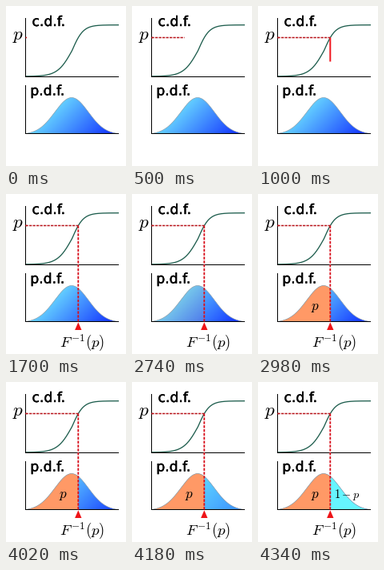
Write a matplotlib script that moves like this. It is 150 by 200 pixels and loops after 9340 ms.

```python
import numpy as np
import matplotlib.pyplot as plt
from matplotlib.animation import FuncAnimation
from matplotlib.patheffects import withStroke

plt.rcParams["mathtext.fontset"] = "cm"
plt.rcParams["font.family"] = "DejaVu Sans"

W, H, DPI = 150, 200, 100
LOOP, STEP = 9340, 20
PX = 72 / DPI                    # points per pixel
X0, XQ, XEND = 24.5, 90.3, 141   # left axis, quantile, right end
YP, Y_CDF, Y_PDF = 39.5, 88.5, 159.5
RED, DARK_RED = "#d8101c", "#b8141c"

fig = plt.figure(figsize=(W / DPI, H / DPI), dpi=DPI, facecolor="white")
ax = fig.add_axes([0, 0, 1, 1])
ax.set_axis_off()


def line(xs, ys, color="black", width=1.0, **kw):
    kw.setdefault("solid_capstyle", "butt")
    return ax.plot(xs, ys, color=color, lw=width * PX, snap=False, **kw)[0]


def label(x, y, s, size, ha="left"):
    return ax.text(x, y, s, fontsize=size * PX, ha=ha, va="baseline",
                   color="black", zorder=8)


def title(x, y, s):
    bold = withStroke(linewidth=0.45 * PX, foreground="black")
    label(x, y, s, 17.2).set_path_effects([bold])


def cdf(x):
    scale = np.where(x < 82.5, 9, 7)
    return Y_CDF - 0.5 - 64.3 / (1 + np.exp((82.5 - x) / scale))


def pdf(x):
    height = 46 * np.exp(-((x - 82) / 21) ** 2 / 2) - 1
    return Y_PDF - np.maximum(height, 0)


def area(a, b, color):
    x = np.linspace(a, b, 150)
    return ax.fill(np.r_[a, x, b], np.r_[Y_PDF, pdf(x), Y_PDF],
                   color=color, lw=0, zorder=2)[0]


# Diagonal blue gradient under the density
gy, gx = np.mgrid[0:H, 0:W] + 0.5
mix = np.clip((gx + gy - 187) / 100, 0, 1)[..., None]
light, deep = np.array([102, 212, 255]), np.array([24, 60, 255])
shade = ax.imshow((light + (deep - light) * mix) / 255, extent=(0, W, H, 0),
                  aspect="auto", interpolation="nearest", zorder=1)
shade.set_clip_path(area(X0, XEND, "none"))

left = area(X0, XQ, "#ff9966")
right = area(XQ, XEND, "#66f5ff")

xs = np.linspace(X0, XEND, 300)
line(xs, pdf(xs), "#8a9aa5", 0.6, zorder=3)
line(xs, cdf(xs), "#1c5c4c", 1.3, zorder=3)
for top, base in ((15, Y_CDF), (99, Y_PDF)):
    line([X0, X0], [top, base + 0.5], zorder=4)
    line([X0, XEND], [base, base], zorder=4)

title(32.5, 25, "c.d.f.")
title(30.3, 111.5, "p.d.f.")
label(15, 42, "$p$", 23, "center")

line([X0, X0 + 1.5], [YP, YP], RED, 1.5, zorder=5)
across = line([], [], DARK_RED, 1.5, dashes=(2.2, 0.8), zorder=6)
down = line([], [], "#f01820", 2, zorder=6)
dashed = line([XQ, XQ], [YP, Y_PDF], RED, 1.8, dashes=(1.9, 0.8), zorder=6)
arrow = ax.fill([XQ, XQ - 4.2, XQ + 4.2], [160.3, 170, 170],
                color="#ee1418", lw=0, zorder=6)[0]
quantile = label(95, 191.5, "$F^{-1}(p)$", 18.8, "center")
left_p = label(71.5, 145, "$p$", 17, "center")
right_p = label(95.4, 145, "$1-p$", 14.3)

ax.set_xlim(0, W)
ax.set_ylim(H, 0)


def steps(t, start, gap, count):
    return min(max((t - start) // gap + 1, 0), count)


def update(i):
    t = i * STEP
    k = steps(t, 100, 100, 17)
    across.set_data([X0, X0 + (XQ - X0) * min(k, 8) / 8], [YP, YP])
    across.set_visible(k > 0)
    down.set_data([XQ, XQ], [YP, YP + 15 * max(k - 8, 0)])
    down.set_visible(8 < k < 17)
    for part in (dashed, arrow, quantile):
        part.set_visible(k == 17)

    k = steps(t, 2740, 40, 7)
    left.set_alpha(1 if k == 7 else k / 8)
    left_p.set_visible(k == 7)

    k = steps(t, 4020, 40, 9)
    right.set_alpha(1 if k == 9 else k / 10)
    right_p.set_visible(k == 9)
    return []


anim = FuncAnimation(fig, update, frames=LOOP // STEP, interval=STEP,
                     init_func=lambda: update(0), repeat=True,
                     repeat_delay=0, cache_frame_data=False)
plt.show()
```
